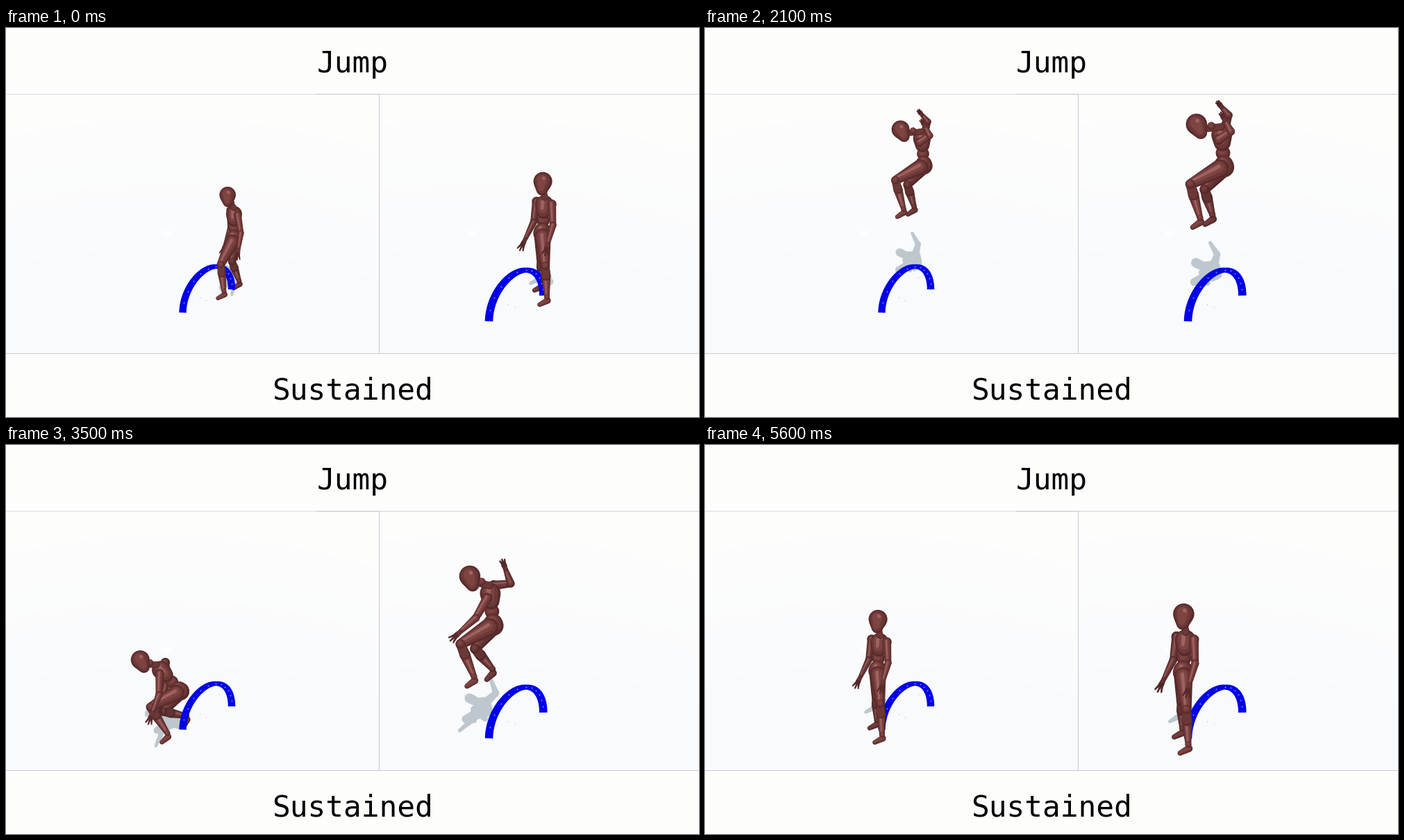
Animation, 998 px wide and 561 px high, one loop 5.65 s. Source, as a matplotlib script:

```python
import numpy as np
import matplotlib.pyplot as plt
from matplotlib.animation import FuncAnimation
from matplotlib.collections import PolyCollection
from matplotlib.patches import Ellipse, Polygon, Rectangle

W, H, DPI = 998, 561, 64
FRAMES, STEP = 113, 50
TOP, BOTTOM, SPLIT = 96, 470, 537
SHADOW = (0.745, 0.78, 0.805)
LIGHT = np.array([-0.45, -0.85])
# radius factor, offset towards the light, colour
TONES = [(1.0, 0.0, (0.345, 0.17, 0.17)),
         (0.80, 0.14, (0.425, 0.22, 0.215)),
         (0.52, 0.32, (0.49, 0.265, 0.26)),
         (0.20, 0.48, (0.62, 0.385, 0.38))]

# Limb angles in degrees from straight down, spine and head from straight up;
# positive turns towards the jump:
# spine, head, arm, far arm, thigh, shin, far shin
STAND = (-4, 3, -3, 8, -5, -3, -2)
READY = (0, 17, -10, 0, 27, -7, -20)
SWING = (-2, 24, 56, 95, 37, -6, -36)
LAUNCH = (-3, 27, 223, 157, 27, -3, -19)
FLOAT = (4, 63, 237, 197, 62, -16, -17)
TUCK = (1, 57, 32, 186, 86, -30, -41)
LAND = (11, 41, 56, 235, 29, -12, -40)
SQUAT = (42, 62, 2, -3, 61, -33, -79)
RISE = (22, 59, -12, -28, 45, -17, -57)


def px(size):
    return size * 72 / DPI


def mix(p, q, u):
    return p + (q - p) * u


def down(angle, length):
    a = np.radians(angle)
    return length * np.array([-np.sin(a), np.cos(a)])


class Track:
    """Smooth curve through (ms, values) keys; resting values stay at rest."""

    def __init__(self, keys):
        self.t = np.array([k[0] for k in keys]) / 1000
        self.v = np.array([k[1] for k in keys], float)
        h = np.diff(self.t)[:, None]
        d = np.diff(self.v, axis=0) / h
        m = np.zeros_like(self.v)
        m[1:-1] = (d[:-1] * h[1:] + d[1:] * h[:-1]) / (h[:-1] + h[1:])
        m[1:-1][np.minimum(abs(d[:-1]), abs(d[1:])) < 8] = 0
        self.m = m

    def at(self, t):
        i = int(np.clip(np.searchsorted(self.t, t, "right") - 1, 0, len(self.t) - 2))
        h = self.t[i + 1] - self.t[i]
        u = np.clip((t - self.t[i]) / h, 0, 1)
        return ((1 + 2 * u) * (1 - u) ** 2 * self.v[i] + u * (1 - u) ** 2 * h * self.m[i]
                + u * u * (3 - 2 * u) * self.v[i + 1] - u * u * (1 - u) * h * self.m[i + 1])


# ---------- skeleton ----------

def arm_chain(shoulder, angle, size):
    """Elbow bends forward when hanging, back over the head when raised."""
    bend = 18 - 0.7 * max(0, angle - 90)
    size = size * (0.75 + 0.25 * np.cos(np.radians(angle)))
    elbow = shoulder + down(angle, 30 * size)
    wrist = elbow + down(angle + bend, 27 * size)
    return [shoulder, elbow, wrist, wrist + down(angle + bend, 18 * size)]


def foot_tip(ankle, size, shin):
    return ankle + down(45 + 0.4 * shin, 15 * size)


def skeleton(pose, ankle, size):
    """All joints, built upwards from the near ankle."""
    spine, head, arm, far_arm, thigh, shin, far_shin = pose
    knee = ankle - down(shin, 44.5 * size)
    pelvis = knee - down(thigh, 48 * size)
    far_knee = pelvis + down(max(thigh - 22, 3), 38 * size)
    far_ankle = far_knee + down(far_shin, 34 * size)
    chest = pelvis - down(-spine, 37 * size)
    skull = chest - down(-head, 36 * size)
    chin = skull + down(8 - 0.55 * head, 12 * size)
    turn = np.clip(head / 45, 0, 1)
    near = chest + size * mix(np.array([12, -4]), np.array([-4, 3]), turn)
    far = chest + size * mix(np.array([-12, -7]), np.array([4, -13]), turn)
    return dict(pelvis=pelvis, chest=chest, skull=skull, chin=chin,
                arm=arm_chain(near, arm, size), far_arm=arm_chain(far, far_arm, size),
                leg=[knee, ankle, foot_tip(ankle, size, shin)],
                far_leg=[far_knee, far_ankle, foot_tip(far_ankle, size, far_shin)])


# ---------- shapes ----------

def taper(p, q, a, b):
    """Outline of two circles joined by their tangents."""
    d = q - p
    dist = np.hypot(*d)
    if dist <= abs(a - b) + 1e-6:
        p, a = (p, a) if a > b else (q, b)
        w = np.linspace(0, 2 * np.pi, 24)
        return p + a * np.c_[np.cos(w), np.sin(w)]
    phi, k = np.arctan2(d[1], d[0]), np.arccos((a - b) / dist)
    w = np.linspace(phi + k, phi + 2 * np.pi - k, 13)
    v = np.linspace(phi - k, phi + k, 13)
    return np.r_[p + a * np.c_[np.cos(w), np.sin(w)], q + b * np.c_[np.cos(v), np.sin(v)]]


class Body:
    """Collects shaded parts from back to front."""

    def __init__(self, size, dim=1.0):
        self.size, self.dim = size, dim
        self.polys, self.colors = [], []

    def part(self, p, q, a, b, tones=TONES):
        a, b = a * self.size, b * self.size
        for k, off, color in tones:
            shift = LIGHT * off * min(a, b)
            self.polys.append(taper(p + shift, q + shift, a * k, b * k))
            self.colors.append(tuple(c * self.dim for c in color))

    def ball(self, p, r):
        self.part(p, p, r, r, TONES[:3])

    def arm(self, shoulder, elbow, wrist, tip):
        self.ball(shoulder, 6.6)
        self.part(shoulder, elbow, 6, 4.6)
        self.ball(elbow, 4.8)
        self.part(elbow, wrist, 5, 3)
        palm = mix(wrist, tip, 0.4)
        self.part(wrist, palm, 2.8, 3.6, TONES[:2])
        reach = tip - palm
        side = np.array([-reach[1], reach[0]])
        for spread in (-0.4, 0, 0.4):
            end = tip + side * spread - reach * abs(spread) * 0.4
            self.part(palm + side * spread * 0.3, end, 1.7, 1, TONES[:1])

    def leg(self, pelvis, knee, ankle, toe):
        self.part(mix(pelvis, knee, 0.12), knee, 11.5, 6.4)
        calf = mix(knee, ankle, 0.32)
        self.part(calf, ankle, 6.8, 3.7)
        self.part(knee, calf, 5.8, 6.8, TONES[:2])
        self.ball(knee, 5.8)
        heel = ankle + [1, 5 * self.size]
        self.part(heel, toe, 4.6, 3.2, TONES[:3])
        self.ball(ankle, 4)

    def torso(self, chest, pelvis):
        up = (chest - pelvis) / np.hypot(*(chest - pelvis)) * self.size
        self.ball(mix(chest, pelvis, 0.54), 9.2)
        self.part(pelvis - up, pelvis + up * 2, 13, 12)
        self.part(chest + up * 3, chest - up * 7, 13.2, 10.6)
        return chest + up * 13

    def head(self, neck, skull, chin):
        self.part(neck, mix(skull, chin, 0.6), 4.8, 4.2, TONES[:2])
        self.ball(mix(neck, skull, 0.4), 5)
        self.part(skull, chin, 13.5, 8, TONES[:3])
        glow = skull + np.array([1, -4.5]) * self.size
        self.part(glow, glow + 1, 2.4, 1.8, [(1, 0, TONES[3][2])])


def build_body(j, size):
    far, near = Body(size, 0.9), Body(size)
    far.leg(j["pelvis"], *j["far_leg"])
    far.arm(*j["far_arm"])
    neck = near.torso(j["chest"], j["pelvis"])
    near.leg(j["pelvis"], *j["leg"])
    near.head(neck, j["skull"], j["chin"])
    near.arm(*j["arm"])
    return far, near


def build_shadow(j, ground, thigh, size):
    """Flatten the joints on the floor; the sides spread with the stance."""
    ankle = j["leg"][1]
    base = np.array([ankle[0], ground - 3 - 0.3 * max(0, ground - ankle[1])])
    spread = 25 * min(1, abs(thigh) / 40)

    def cast(p, side=0.0):
        return base + (p - ankle) * [0.6, 0.2] + [0, side * spread]

    chest, pelvis, skull = (cast(j[k]) for k in ("chest", "pelvis", "skull"))
    shapes = [(skull - 3, skull + [3, 0], 6, 6), (skull, chest, 4, 8), (chest, pelvis, 9, 9)]
    for arm, leg, side in (("arm", "leg", 1), ("far_arm", "far_leg", -1)):
        elbow, hand = cast(j[arm][1], side * 0.5), cast(j[arm][3], side)
        knee, foot = cast(j[leg][0], side * 0.3), cast(j[leg][1])
        shapes += [(chest, elbow, 6, 4), (elbow, hand, 4, 2.2),
                   (pelvis, knee, 8, 5), (knee, foot, 5, 3.5)]
    return [taper(p, q, a * size, b * size) for p, q, a, b in shapes]


def bezier(a, b, c, d):
    u = np.linspace(0, 1, 30)[:, None]
    a, b, c, d = np.array([a, b, c, d], float)
    return (1 - u) ** 3 * a + 3 * u * (1 - u) ** 2 * b + 3 * u * u * (1 - u) * c + u ** 3 * d


def arch_shape():
    """Centre line and outline of the hoop, its foot at the origin."""
    rise = bezier((0, 0), (0.5, -35), (27, -66.5), (48, -66.5))
    fall = bezier((48, -66.5), (63, -66.5), (70.5, -53), (70.5, -33.5))
    mid = np.r_[rise, fall[1:]]
    tangent = np.gradient(mid, axis=0)
    tangent /= np.hypot(*tangent.T)[:, None]
    normal = np.c_[-tangent[:, 1], tangent[:, 0]]
    half = (3.2 + 2 * abs(normal[:, 0]))[:, None]
    return mid, np.r_[mid + normal * half, (mid - normal * half)[::-1]]


# ---------- stage ----------

fig = plt.figure(figsize=(W / DPI, H / DPI), dpi=DPI, facecolor="#fdfdfc")
ax = fig.add_axes([0, 0, 1, 1])
ax.axis("off")

yy, xx = np.mgrid[TOP:BOTTOM, 0:W]
bend = 0.0005 * (xx - np.where(xx < SPLIT, 230, 670)) ** 2
depth = np.clip((yy - 130 - bend) / 280, 0, 1)[..., None]
floor = mix(np.array([253, 253, 252.0]), np.array([248, 250, 252.0]), depth) / 255
ax.imshow(floor, extent=(0, W, BOTTOM, TOP), aspect="auto", interpolation="nearest", zorder=0)
ax.set_xlim(0, W)
ax.set_ylim(H, 0)


def box(x, y, w, h, color, z=8):
    ax.add_patch(Rectangle((x, y), w, h, fc=color, lw=0, antialiased=False, zorder=z))


box(0, 95, 447, 1, "#dcdee0")
box(447, 95, 91, 1, "#bfc2c4")
box(538, 95, W - 538, 1, "#d2d4d6")
box(0, 469, W, 1, "#c8cbcd")
box(SPLIT, 96, 1, 374, "#c8cbcf")

for text, base in (("Jump", 64), ("Sustained", 535)):
    ax.text(499, base, text, family="DejaVu Sans Mono", fontsize=px(42.7),
            color="black", ha="center", va="baseline", zorder=9)


class Panel:
    """One jumper with its hoop; the hoop's foot and scale place the scene."""

    def __init__(self, x0, x1, foot, scale, size, poses, steps):
        self.poses, self.steps = Track(poses), Track(steps)
        self.foot, self.size = np.array(foot), size
        self.start, self.end = self.steps.v[0], self.steps.v[-2]
        clip = Rectangle((x0, TOP), x1 - x0, BOTTOM - 1 - TOP, transform=ax.transData)
        self.shade, self.far, self.near = (self.layer(z, clip) for z in (2, 3, 5))
        self.shade.set_facecolor(SHADOW)
        mid, outline = arch_shape()
        self.arch = ax.add_patch(Polygon(self.foot + outline * scale, fc="#0202e6", lw=0))
        self.dots, = ax.plot(*(self.foot + mid[4:-2:5] * scale).T, ls="", marker="s",
                             ms=px(1.7), mew=0, color="#8f92ff")
        for spot in ((24.5, -22.5), (33.5, -18.5), (52.5, -51.5)):
            box(*(self.foot + np.array(spot) * scale), 1.5, 1.5, "#c9cdd0", 1)
        glare = self.foot + np.array([-23.5, -114.5]) * scale
        ax.add_patch(Ellipse(glare, 14, 9, fc="#fefefe", lw=0, zorder=1))

    def layer(self, z, clip):
        coll = PolyCollection([], linewidths=0, edgecolors="none", zorder=z)
        ax.add_collection(coll, autolim=False)
        coll.set_clip_path(clip)
        return coll

    def show(self, t):
        pose, ankle = self.poses.at(t), self.steps.at(t)
        gone = np.clip((self.start[0] - ankle[0]) / (self.start[0] - self.end[0]), 0, 1)
        size = self.size + 0.13 * min(1, 2 * gone)
        ground = mix(self.start[1], self.end[1], gone)
        joints = skeleton(pose, ankle, size)
        self.shade.set_verts(build_shadow(joints, ground, pose[4], size))
        for coll, body in zip((self.far, self.near), build_body(joints, size)):
            coll.set_verts(body.polys)
            coll.set_facecolor(body.colors)
        z = 6 if ankle[0] < self.foot[0] else 4
        self.arch.set_zorder(z)
        self.dots.set_zorder(z + 0.1)


panels = [
    Panel(0, SPLIT, (254.5, 410.5), 1, 0.88,
          [(0, READY), (1400, SWING), (1650, LAUNCH), (2100, FLOAT), (2900, LAND),
           (3500, SQUAT), (4200, RISE), (5600, STAND)],
          [(0, (314, 380)), (1400, (311, 379)), (1650, (305, 335)), (2100, (286, 261)),
           (2900, (231, 373)), (3150, (233, 416)), (4200, (231, 415)), (5600, (255, 418))]),
    Panel(SPLIT + 1, W, (695.5, 423), 1.11, 1.01,
          [(0, STAND), (800, SWING), (1400, LAUNCH), (2100, FLOAT), (2900, TUCK),
           (4200, LAND), (4700, RISE), (5600, STAND)],
          [(0, (779, 388)), (1000, (777, 387)), (1400, (750, 327)), (2100, (713, 274)),
           (2900, (683, 264)), (3500, (674, 334)), (3950, (670, 429)), (4600, (670, 430)),
           (5600, (696, 432))]),
]


def draw(i):
    for panel in panels:
        panel.show(i * STEP / 1000)
    return []


anim = FuncAnimation(fig, draw, frames=FRAMES, interval=STEP, repeat=True, repeat_delay=0)
plt.show()
```
